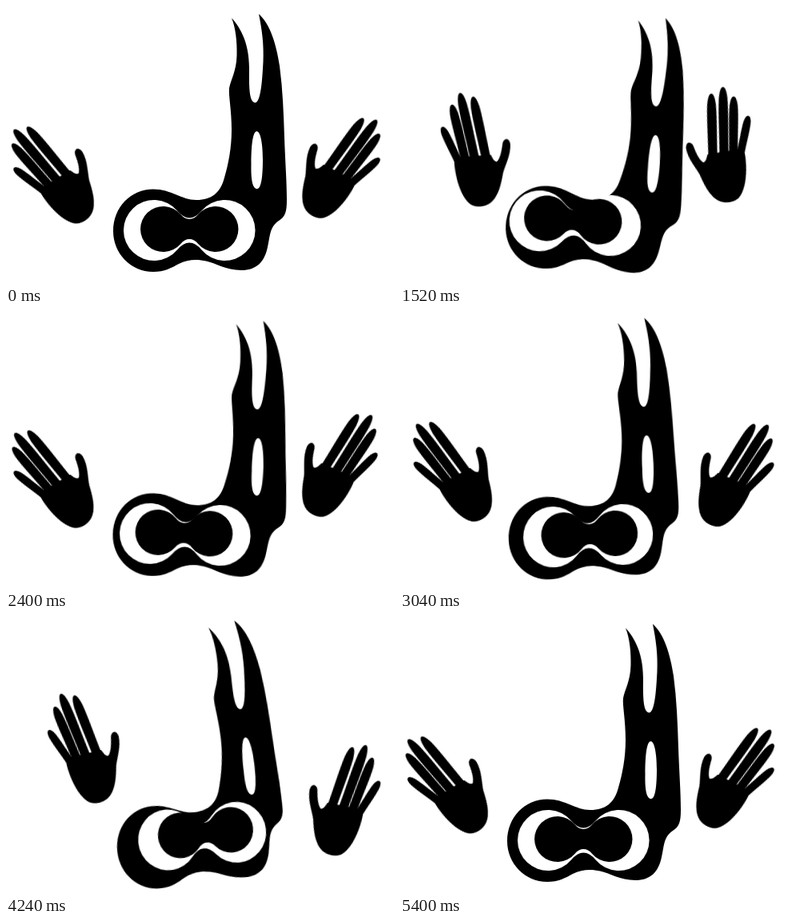
These frames come from a looping animation (485x347 px, 5440 ms). An HTML page:

```html
<!DOCTYPE html>
<html lang="en">
<head>
<meta charset="utf-8">
<title>Waving figure</title>
<style>
  html, body { margin: 0; width: 100%; height: 100%; overflow: hidden; background: #fff; }
  svg { display: block; width: 485px; height: 347px; }

  /* Every part swings between a few poses with a sine-like ease */
  .body, .eye, .left, .right {
    animation: 5440ms cubic-bezier(.37, 0, .63, 1) infinite;
  }
  .body { animation-name: lean; transform-origin: 245px 252px; }
  .left { animation-name: wave-left; }
  .right { animation-name: wave-right; }
  .eye {
    --reach: 1px;
    animation-name: look, bob;
    animation-duration: 5440ms, 1360ms;
    animation-direction: normal, alternate;
  }
  .pupil { --reach: 1.32px; }
  .white { fill: #fff; }

  @keyframes lean {
    0%, 100% { transform: translate(0, 0) rotate(0deg) scaleX(1); }
    28% { transform: translate(0, 0) rotate(3.8deg) scaleX(1); }
    79% { transform: translate(-1.5px, 2px) rotate(-6.4deg) scaleX(.975); }
  }
  @keyframes look {
    0%, 100% { transform: translateX(0); }
    22%, 32% { transform: translateX(calc(var(--reach) * -9)); }
    74%, 80% { transform: translateX(calc(var(--reach) * 15)); }
  }
  @keyframes bob {
    from { translate: 0 0; }
    to { translate: 0 calc(var(--reach) * -7.5); }
  }
  @keyframes wave-left {
    0%, 100% { transform: translate(97px, 270px) rotate(-30.5deg); }
    24% { transform: translate(99px, 250px) rotate(-1deg); }
    48.5% { transform: translate(96px, 271px) rotate(-32deg); }
    72% { transform: translate(117px, 230px) rotate(-10deg); }
  }
  @keyframes wave-right {
    0%, 100% { transform: translate(385px, 264px) rotate(26.3deg); }
    25% { transform: translate(415px, 245px) rotate(-12deg); }
    49.5% { transform: translate(383px, 258px) rotate(27deg); }
    70% { transform: translate(413px, 307px) rotate(7deg); }
  }
</style>
</head>
<body>
<svg viewBox="0 0 485 347">
  <defs>
    <path id="finger" d="M-5,6 C-4.8,-22 -5.8,-42 -4.8,-58 Q-3.4,-70 0,-70 Q3.4,-70 4.8,-58 C5.8,-42 4.8,-22 5,6Z"/>
    <!-- Left hand, origin at the heel of the palm -->
    <g id="hand">
      <path d="M-28,-63 C-29,-40 -22,-12 -10,-3 C-4,1 6,1 13,-3 C24,-9 29,-26 32,-40
        C35,-50 43,-62 43,-76 C42.5,-84 36,-85 33.5,-78 C32,-70 30,-59 25,-55 C21,-56 20,-60 18,-64Z"/>
      <use href="#finger" transform="translate(-23,-58) rotate(-22.5) scale(.95,.68)"/>
      <use href="#finger" transform="translate(-14.5,-62) rotate(-11) scale(1.08,.98)"/>
      <use href="#finger" transform="translate(-2.5,-62) rotate(-9.8) scale(1.13,1.18)"/>
      <use href="#finger" transform="translate(12,-60) rotate(-9.2) scale(1.13,1.13)"/>
    </g>
  </defs>

  <g class="left"><use href="#hand"/></g>
  <g class="right"><use href="#hand" transform="scale(-1,1)"/></g>

  <g class="body">
    <path d="M282,15 C290,24 304,42 304,78 C304,95 303,121 311.5,121 C319,121 320.5,88 321.5,70
      C322.5,48 320,30 316,10 C330,22 338,48 342,75 C346,105 347,135 348,165
      C349,195 351,220 351,243 C351,258 349,264 341,269 C329,277 330,290 327,302
      C323,321 313,331 294,331 C275,331 262,322 250,319.5 C240,317 227,317 216,323
      C207,328 198,333 184,333 C156,333 134,310 134,282 C134,252 156,229.5 184,229.5
      C207,229.5 219,243 238,243 C257,243 268,234 273,215 C278,198 282,178 282,155
      C282,130 278,112 279,103 C281,92 288,82 288.5,62 C289,45 287,27 282,15Z"/>
    <path class="white" d="M313.5,157 C318,157 321,172 321,192 C321,214 319,229 314,229
      C308.5,229 306,219 306.5,198 C306.5,174 308.5,157 313.5,157Z"/>
    <path class="eye white" d="M214,256.5 Q221.6,265.5 229.3,265.5 T244.5,256.5 A38,38 0 1 1 244.5,305.5
      Q237,296.5 229.3,296.5 T214,305.5 A38,38 0 1 1 214,256.5Z"/>
    <path class="eye pupil" d="M218.3,261.1 Q223.3,267 229.3,267 T240.2,261.1 A28.5,28.5 0 1 1 240.2,297.9
      Q235.2,292 229.3,292 T218.3,297.9 A28.5,28.5 0 1 1 218.3,261.1Z"/>
  </g>
</svg>
</body>
</html>
```
